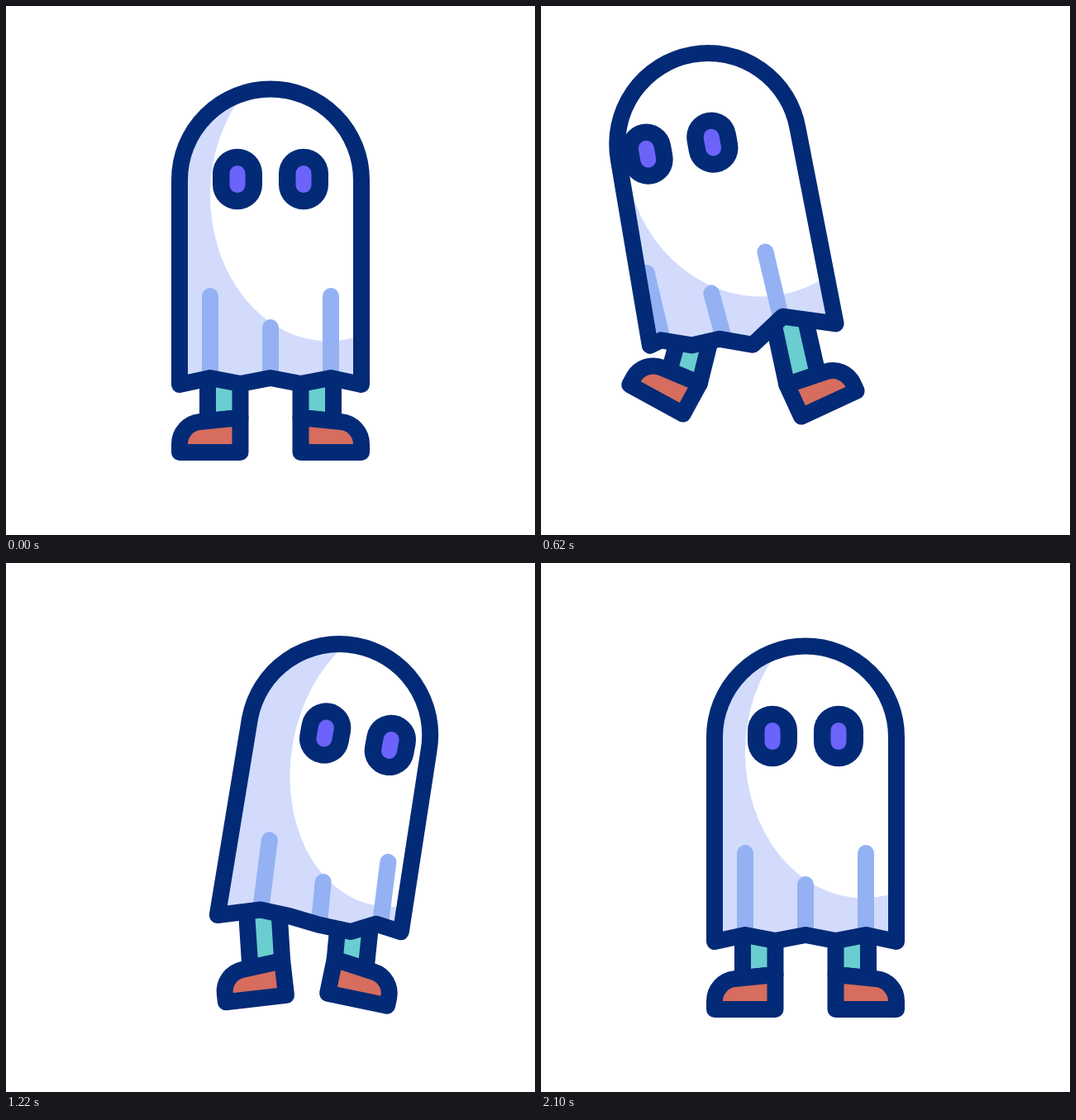
Animation of 640x640 px, one loop 2.4 s. Source, as an HTML page with a canvas:

```html
<!DOCTYPE html>
<html lang="en">
<head>
<meta charset="utf-8">
<title>Swaying ghost</title>
<style>
  html, body { margin: 0; width: 100%; height: 100%; overflow: hidden; background: #fff; }
  canvas { display: block; width: 100vw; height: 100vh; }
</style>
</head>
<body>
<canvas id="stage" width="640" height="640"></canvas>
<script>
const ctx = document.getElementById('stage').getContext('2d');
const LOOP = 2400, STEP = 20, LANDING = 1110;
const NAVY = '#032a76', SHADE = '#d2dbfc', FOLD = '#94b1f3',
      TEAL = '#6acdd0', SHOE = '#d66d5e', PUPIL = '#6c63fa';

// Hem points from the head centre: x, y, then offsets at full left and full right lean
const HEM = [
  [-110, 247.5, -2, -20, 7, -1],
  [-73, 239.5, -25, -16, 27, -13],
  [-36.5, 246.5, -26, -10.5, 25.5, -22],
  [0, 239.5, -28, -5, 29, -5],
  [36.5, 246.5, -26, 2, 31, -14],
  [73, 239.5, -21, -18.5, 19, -26],
  [110, 247.5, 4, -6.5, 10, -32]
];
// Fold tops from the head centre
const FOLDS = [[-73, 140.5], [0, 178.5], [73, 140.5]];
// Offsets and foot turn at full left and full right lean
const LEGS = [
  { side: -1, heel: [283.5, 540, -113, -3, 85, -13.5], turn: [29, -10], hip: [283.5, 450, -80, 0, 72, -30] },
  { side: 1, heel: [356.5, 540, -42, 0, 50, -17], turn: [-25, 18], hip: [356.5, 450, -77, -28, 69, -5] }
];

// Symmetric cubic Bezier ease with handles at a and 1 - a
function ease(u, a) {
  let lo = 0, hi = 1, s = 0.5;
  for (let i = 0; i < 24; i++) {
    const v = 1 - s;
    const x = 3 * v * v * s * a + 3 * v * s * s * (1 - a) + s * s * s;
    if (x < u) lo = s; else hi = s;
    s = (lo + hi) / 2;
  }
  return s * s * (3 - 2 * s);
}

function track(t, keys, a) {
  if (t <= keys[0][0]) return keys[0][1];
  for (let i = 1; i < keys.length; i++) {
    const [t0, v0] = keys[i - 1], [t1, v1] = keys[i];
    if (t < t1) return v0 + (v1 - v0) * ease((t - t0) / (t1 - t0), a);
  }
  return keys[keys.length - 1][1];
}

const SWAY = [[0, 0], [700, -1], [1520, 1], [2100, 0]];
const LIFT = [[0, 0], [535, -46.5], [LANDING, 5], [1560, -44.6], [2100, 0]];

function pose(t) {
  const p = track(t, SWAY, 0.7);
  const l = Math.max(-p, 0), r = Math.max(p, 0);
  const d = Math.min(Math.abs(t - LANDING) / 350, 1);
  return {
    p, l, r,
    y: track(t, LIFT, 1 / 3),
    squash: 7.5 * Math.cos(d * Math.PI / 2) ** 2
  };
}

const lean = (k, m) => [m[0] + m[2] * k.l + m[4] * k.r, m[1] + m[3] * k.l + m[5] * k.r];

function line(points, close) {
  ctx.beginPath();
  points.forEach(([x, y]) => ctx.lineTo(x, y));
  if (close) ctx.closePath();
}

function paint(fill) {
  ctx.fillStyle = fill;
  ctx.fill();
  ctx.strokeStyle = NAVY;
  ctx.stroke();
}

function pill(x, y, w, h, color) {
  ctx.fillStyle = color;
  ctx.beginPath();
  ctx.roundRect(x - w / 2, y - h / 2, w, h, w / 2);
  ctx.fill();
}

function drawLeg(k, leg) {
  const s = leg.side, drop = k.y - k.squash;
  const [hx, hy] = lean(k, leg.heel);
  const [px, py] = lean(k, leg.hip);
  const angle = (leg.turn[0] * k.l + leg.turn[1] * k.r) * Math.PI / 180;
  const c = Math.cos(angle), n = Math.sin(angle);
  const onFoot = (x, y) => [hx + x * c - y * n, hy + drop + x * n + y * c];

  line([[px, py + drop], onFoot(0, -42), onFoot(39.5 * s, -38), [px + 39.5 * s, py + drop]]);
  paint(TEAL);

  ctx.save();
  ctx.translate(hx, hy + drop);
  ctx.rotate(angle);
  ctx.beginPath();
  ctx.moveTo(0, 0);
  ctx.lineTo(73.5 * s, 0);
  ctx.arcTo(73.5 * s, -34.3, 0, -42, 27);
  ctx.lineTo(0, -42);
  ctx.closePath();
  paint(SHOE);
  ctx.restore();
}

function sheet(hem) {
  ctx.beginPath();
  ctx.moveTo(...hem[0]);
  ctx.lineTo(-110, 0);
  ctx.arc(0, 0, 110, Math.PI, 0);
  for (let i = hem.length - 1; i > 0; i--) ctx.lineTo(...hem[i]);
  ctx.closePath();
}

function drawBody(k) {
  const hem = HEM.map(m => {
    const [x, y] = lean(k, m);
    return [x, y - k.squash];
  });
  ctx.save();
  ctx.translate(320 - 119 * k.l + 127.5 * k.r, 210.5 + k.y);
  ctx.rotate((16 * k.r - 10.2 * k.l) * Math.PI / 180);

  ctx.save();
  sheet(hem);
  ctx.clip();
  ctx.fillStyle = SHADE;
  ctx.fillRect(-160, -160, 320, 460);
  ctx.fillStyle = '#fff';
  ctx.beginPath();
  ctx.ellipse(70 + 15 * k.p, 18.5, 143 - 15 * k.p, 176.5, 0, 0, 7);
  ctx.fill();
  ctx.strokeStyle = FOLD;
  for (const [x, y] of FOLDS) {
    line([[x - 28 * k.l + 20 * k.r, y], [x - 22 * k.l + 29 * k.r, 245]]);
    ctx.stroke();
  }
  ctx.restore();

  sheet(hem);
  ctx.strokeStyle = NAVY;
  ctx.stroke();

  // The eyes sink a little as the body lands
  const eyeY = 0.35 * k.squash - 1;
  for (const side of [-40, 40]) {
    const eyeX = side + 35 * k.p;
    pill(eyeX, eyeY, 60, 73.5, NAVY);
    pill(eyeX, eyeY, 19, 33, PUPIL);
  }
  ctx.restore();
}

function draw(t) {
  const k = pose(t);
  ctx.fillStyle = '#fff';
  ctx.fillRect(0, 0, 640, 640);
  ctx.lineWidth = 20;
  ctx.lineCap = ctx.lineJoin = 'round';
  LEGS.forEach(leg => drawLeg(k, leg));
  drawBody(k);
}

const start = performance.now();
function tick() {
  const t = (performance.now() - start) % LOOP;
  draw(Math.floor(t / STEP) * STEP);
  requestAnimationFrame(tick);
}
tick();
</script>
</body>
</html>
```
